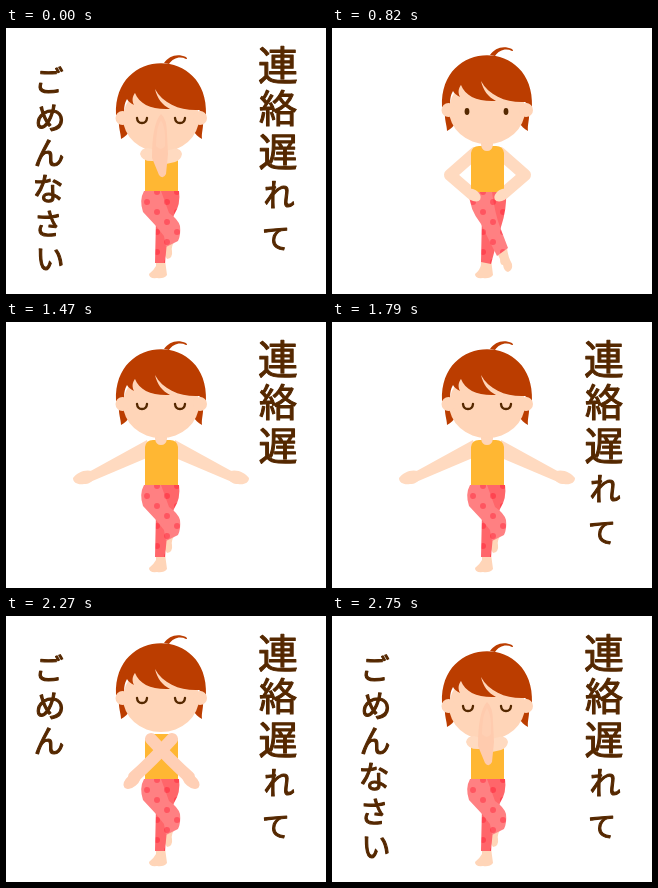
These frames come from a looping animation (320 by 266 pixels, 2910 ms). An HTML page:

```html
<!DOCTYPE html>
<html lang="ja">
<head>
<meta charset="utf-8">
<style>
  html, body { margin: 0; width: 100%; height: 100%; overflow: hidden; background: #fff; }
  svg { display: block; width: 100vw; height: 100vh; }
  .hair { fill: #bb3d00; }
  .skin { fill: #ffd5b8; }
  .limb { fill: none; stroke: #ffdac0; stroke-width: 12; stroke-linejoin: round; stroke-linecap: round; }
  .hand { fill: #ffdac0; }
  .shirt { fill: #ffb733; }
  .lash { fill: none; stroke: #552800; stroke-width: 2.4; stroke-linecap: round; }
  text {
    font-family: "Noto Sans CJK JP", "Noto Sans CJK", sans-serif; font-weight: 500;
    text-anchor: middle; fill: #552800; stroke: #552800; stroke-width: 1.1; stroke-linejoin: round;
  }
</style>
</head>
<body>
<svg viewBox="0 0 320 266">
  <defs>
    <pattern id="dots" width="20" height="20" patternUnits="userSpaceOnUse">
      <rect width="20" height="20" fill="#ff8082"/>
      <circle cx="1" cy="14" r="3" fill="#ff5560"/>
      <circle cx="21" cy="14" r="3" fill="#ff5560"/>
      <circle cx="11" cy="4" r="3" fill="#ff5560"/>
    </pattern>
    <pattern id="dotsBack" width="20" height="20" patternUnits="userSpaceOnUse">
      <rect width="20" height="20" fill="#ff666a"/>
      <circle cx="11" cy="4" r="3" fill="#ff4450"/>
      <circle cx="1" cy="14" r="3" fill="#ff4450"/>
      <circle cx="21" cy="14" r="3" fill="#ff4450"/>
    </pattern>
    <path id="elbow" class="limb" d="M143 125L118 147L140 166"/>
    <g id="reach">
      <path class="hand" d="M141 118L81 151L84 160L143 135Z"/>
      <path class="hand" d="M86 149C78 147 71 151 67 156C67 161 72 163 78 162C83 162 86 160 88 156Z"/>
    </g>
    <g id="fold">
      <path class="limb" style="stroke:#ffcfb5" d="M145 123Q166 146 183 161"/>
      <ellipse cx="185" cy="165" rx="10" ry="6" fill="#ffcfb5" transform="rotate(40 185 165)"/>
    </g>
  </defs>

  <!-- arms behind the shirt -->
  <g data-pose="stand step">
    <use href="#elbow"/><use href="#elbow" transform="matrix(-1 0 0 1 311 0)"/>
  </g>
  <g data-pose="open">
    <use href="#reach"/><use href="#reach" transform="matrix(-1 0 0 1 310 0)"/>
  </g>

  <path class="shirt" d="M139 125Q140 118 147 118H164Q171 118 172 125V168H139Z"/>
  <path class="skin" data-pose="stand step open" d="M149 108H161V117Q160 123 155 123Q150 123 149 117Z"/>

  <!-- legs -->
  <g data-pose="stand">
    <path class="skin" d="M148 229H162V240Q168 243 168 247Q166 251 158 250L155 248L152 250Q144 251 142 247Q142 243 148 240Z"/>
    <path fill="url(#dots)" d="M137 167H174Q174 178 171 190L163 231H147L139 190Q136 178 137 167Z"/>
  </g>
  <g data-pose="step">
    <path class="skin" d="M149 231H159L161 247Q158 251 151 250Q143 251 143 246Q148 242 149 237Z"/>
    <path class="skin" d="M165 225L175 220Q176 229 180 236Q181 242 176 244Q172 243 171 237Q168 237 168 231Z"/>
    <path fill="url(#dotsBack)" d="M152 164H174Q175 181 169 199L159 236L149 234L150 185Z"/>
    <path fill="url(#dots)" d="M137 164H160Q163 186 168 199L176 220L165 228L149 196Q137 181 137 164Z"/>
  </g>
  <g data-pose="open cross bow">
    <path class="skin" d="M158 212L169 213Q165 218 166 223Q167 230 161 231Q157 226 158 212Z"/>
    <path class="skin" d="M150 232H159L161 247Q158 251 151 250Q143 251 143 246Q148 242 150 238Z"/>
    <path fill="url(#dotsBack)" d="M148 163H173Q175 176 168 187L162 203L159 235H149L150 190Z"/>
    <path fill="url(#dots)" d="M138 163H155L163 185Q172 191 174 198Q175 207 172 213L160 219L158 208L150 198L137 184Q133 172 138 163Z"/>
  </g>

  <g data-pose="stand step">
    <ellipse class="hand" cx="141" cy="167" rx="8.5" ry="5.5" transform="rotate(32 141 167)"/>
    <ellipse class="hand" cx="170" cy="167" rx="8.5" ry="5.5" transform="rotate(-32 170 167)"/>
  </g>
  <g data-pose="cross">
    <use href="#fold"/><use href="#fold" transform="matrix(-1 0 0 1 311 0)"/>
  </g>

  <g id="head">
    <path class="hair" d="M158 27C163 20 171 17 180 21Q182 23 180 23C174 20 167 22 163 28Z"/>
    <path class="hair" d="M113 80C112 92 115 97 115 103C119 101 122 98 124 94H187C189 98 192 101 196 103C195 97 198 92 197 80Z"/>
    <ellipse class="skin" cx="155" cy="82" rx="38" ry="34"/>
    <path class="hair" d="M110 79C107 10 203 10 200 79L193 74C175 75 157 68 149 53C151 62 156 69 164 73C146 74 133 68 129 57C126 61 126 65 128 69C124 67 122 65 121 63C118 68 118 73 118 79Z"/>
    <circle class="skin" cx="116.500" cy="82" r="7"/>
    <circle class="skin" cx="194" cy="82" r="7"/>
    <g data-pose="stand step" fill="#552800">
      <ellipse cx="135" cy="83.500" rx="2.400" ry="3.400"/>
      <ellipse cx="174" cy="83.500" rx="2.400" ry="3.400"/>
    </g>
    <g data-pose="open cross bow">
      <path class="lash" d="M131 82Q131.500 87 136 87Q140.500 87 141 82M169 82Q169.500 87 174 87Q178.500 87 179 82"/>
    </g>
  </g>

  <!-- entwined arms in front of the face -->
  <g data-pose="bow">
    <path class="hand" d="M134 126Q135 120 142 120L155 124L167 121Q175 120 176 126Q175 132 169 134L160 136L148 133Q136 134 134 126Z"/>
    <path fill="#ffcbae" d="M155 86Q161 91 161 106L162 126L160 146Q157 152 153 147L146 130Q146 96 155 86Z"/>
    <path fill="#ffd0b4" d="M150 118Q150 99 155 92Q160 99 159 118Q155 124 150 118Z"/>
  </g>

  <g id="words"></g>
</svg>
<script>
  const LOOP = 2910, TEXT_START = 1150, TEXT_STEP = 160, TEXT_CLEAR = 160;

  const POSES = [[0, "bow"], [160, "stand"], [820, "step"], [1470, "open"], [1950, "cross"], [2430, "bow"]];

  // character, centre x, centre y, size
  const CHARS = [
    ["連", 272, 36.5, 40], ["絡", 272, 80, 38], ["遅", 272, 123, 39], ["れ", 273, 166, 31], ["て", 270, 210, 28],
    ["ご", 43, 53, 29], ["め", 44, 89, 31], ["ん", 43, 124, 31], ["な", 42, 160, 31], ["さ", 42, 196, 29], ["い", 44, 231, 29]
  ];

  const words = document.getElementById("words");
  const head = document.getElementById("head");
  const parts = [...document.querySelectorAll("[data-pose]")];

  const glyphs = CHARS.map(([char, x, y, size]) => {
    const el = document.createElementNS(words.namespaceURI, "text");
    el.textContent = char;
    el.setAttribute("x", x);
    el.setAttribute("y", y + size * 0.38);
    el.setAttribute("font-size", size);
    return words.appendChild(el);
  });

  const show = (el, on) => { el.style.display = on ? "" : "none"; };

  function draw(t) {
    const pose = POSES.filter(([start]) => start <= t).pop()[1];
    parts.forEach(el => show(el, el.dataset.pose.split(" ").includes(pose)));
    head.setAttribute("transform", pose === "bow" ? "translate(0 8)" : "");
    glyphs.forEach((el, i) => show(el, t < TEXT_CLEAR || t >= TEXT_START + i * TEXT_STEP));
  }

  function tick() {
    draw(performance.now() % LOOP);
    requestAnimationFrame(tick);
  }
  tick();
</script>
</body>
</html>
```
